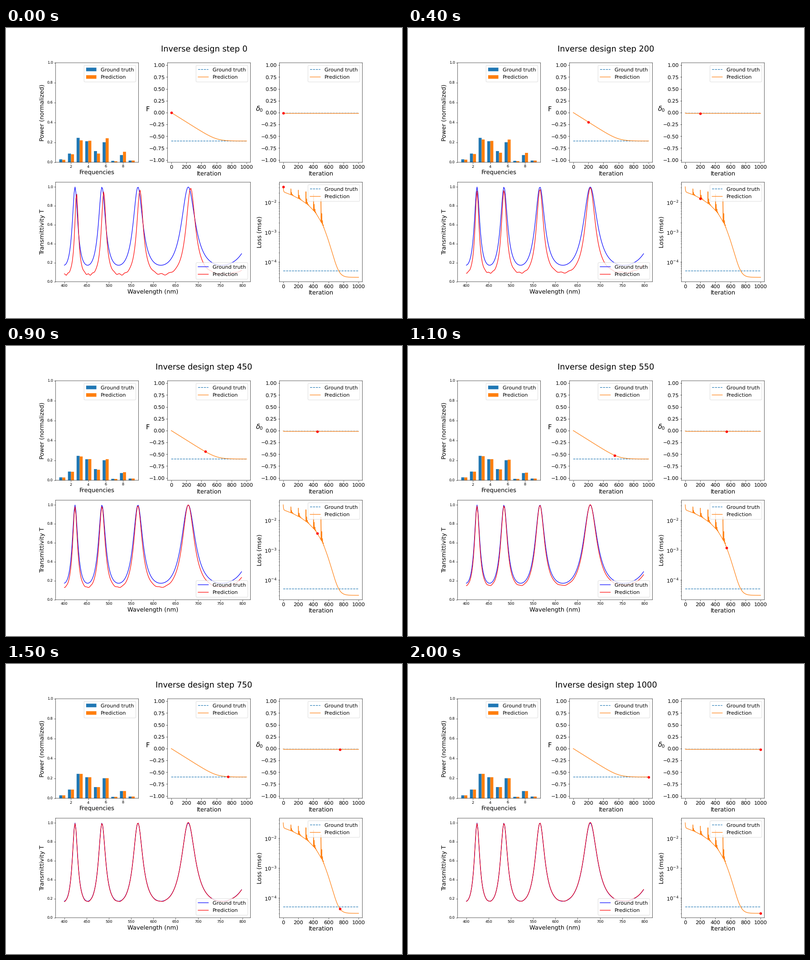
Animation of 874x641 px, one loop 2.1 s. Source, as a matplotlib script:

```python
import numpy as np
import matplotlib.pyplot as plt
from matplotlib.animation import FuncAnimation

W, H = 874, 641
DPI = W / 15
STRIDE, LAST = 50, 1000
SMALL, TICK, LABEL, SYMBOL, TITLE = 10, 14, 16, 18, 22

# Soft, unsnapped lines and glyphs
plt.rcParams.update({
    "font.family": "DejaVu Sans",
    "font.size": SMALL,
    "text.hinting": "none",
    "path.snap": False,
    "legend.fontsize": TICK,
    "legend.labelspacing": 0.53,
    "legend.borderpad": 0.41,
})

steps = np.arange(LAST + 1)
lam = np.arange(400, 800, 2)

# F falls at a constant rate, then settles; delta snaps into place at once
F_TRUE, D_TRUE, LOSS_TRUE = -0.6, -0.013, 5e-5
gap = 0.068 * np.log1p(np.exp((600 - steps) / 68))
jump = np.exp(-steps / 4)
f_path = F_TRUE + gap
d_path = -0.017 + 0.010 * jump


def loss_curve():
    """Loss that follows the gap in F, with a ringing spike every 100 steps."""
    base = 3.05e-5 + 0.278 * gap ** 2 / (1 + 5.92 * gap)
    log = np.log10(base) + 0.17 * jump
    for k in range(5):
        t = np.clip(steps - 100 * k - 101, 0, None)
        ring = np.exp(-t / 12) * np.cos(np.pi * t / 10) ** 2
        log += np.where(steps > 100 * (k + 1), 0.2 * 1.4 ** k * ring, 0)
    return 10 ** log


loss = loss_curve()

orders = np.arange(1, 10)
power_true = np.array([0.030, 0.088, 0.246, 0.212, 0.113, 0.202, 0.015, 0.073, 0.018])
power_start = np.array([0.025, 0.081, 0.221, 0.217, 0.088, 0.242, 0.010, 0.106, 0.018])

PATH = 3391.5


def airy(path, finesse):
    return 1 / (1 + finesse * np.sin(np.pi * path / lam) ** 2)


def predicted_power(step):
    return power_true + (power_start - power_true) * gap[step] / gap[0]


def predicted_spectrum(step):
    q = gap[step] / gap[0]
    path = PATH * (1 + 0.008 * jump[step])
    u = np.clip((lam - 424) / 254, 0, 1)
    gain = 1.007 - 0.02 * q - (0.012 + 0.035 * q) * (1 - u)
    frac = path / lam % 1
    ripple = np.cos(2 * np.pi * (frac - 0.455) / 0.155) * np.sin(np.pi * frac) ** 4
    return gain * airy(path, 4.74 + 6.8 * q) - (0.002 + 0.007 * q) * ripple


fig = plt.figure(figsize=(15 + 1e-6, H / DPI + 1e-6), dpi=DPI, facecolor="white")
grid = fig.add_gridspec(2, 3, left=0.125, right=0.9, bottom=0.125, top=0.88,
                        wspace=0.35, hspace=0.2)
title = fig.suptitle("", fontsize=TITLE, y=0.94)


def panel(spot, xlabel, ylabel, size=LABEL, **kw):
    ax = fig.add_subplot(spot)
    ax.set_xlabel(xlabel, fontsize=LABEL)
    ax.set_ylabel(ylabel, fontsize=size, **kw)
    return ax


def history(spot, ylabel, truth, path, **kw):
    """Dashed target, full optimisation path and a moving marker."""
    ax = panel(spot, "Iteration", ylabel, **kw)
    ax.plot([0, LAST], [truth, truth], "--", color="C0", label="Ground truth")
    ax.plot(steps, path, color="C1", label="Prediction")
    dot, = ax.plot([0], [path[0]], "ro")
    ax.set(xlim=(-50, 1050), xticks=range(0, LAST + 1, 200))
    ax.tick_params(labelsize=TICK)
    ax.legend(loc="upper right")
    return ax, dot


ax_bar = panel(grid[0, 0], "Frequencies", "Power (normalized)")
ax_bar.bar(orders - 0.175, power_true, 0.35, color="C0", label="Ground truth")
bars = ax_bar.bar(orders + 0.175, power_start, 0.35, color="C1", label="Prediction")
ax_bar.set(xlim=(0.215, 9.785), ylim=(0, 1), xticks=range(2, 9, 2))
ax_bar.legend(loc="upper right")

ax_f, dot_f = history(grid[0, 1], "F", F_TRUE, f_path, size=SYMBOL, rotation=0)
ax_d, dot_d = history(grid[0, 2], r"$\delta_0$", D_TRUE, d_path,
                      size=SYMBOL, rotation=0)
for ax in (ax_f, ax_d):
    ax.set(ylim=(-1.05, 1.05), yticks=np.linspace(-1, 1, 9))

ax_t = panel(grid[1, :2], "Wavelength (nm)", "Transmittivity T")
ax_t.plot(lam, airy(PATH, 4.75), "b", label="Ground truth")
curve, = ax_t.plot(lam, predicted_spectrum(0), "r", label="Prediction")
ax_t.set(xlim=(380.1, 817.9), ylim=(0, 1.05), xticks=range(400, 801, 50))
ax_t.legend(loc="lower right")

ax_l, dot_l = history(grid[1, 2], "Loss (mse)", LOSS_TRUE, loss)
ax_l.set_yscale("log")
ax_l.set_ylim(10 ** -4.664, 10 ** -1.336)

tracks = [(dot_f, f_path), (dot_d, d_path), (dot_l, loss)]


def update(i):
    step = i * STRIDE
    title.set_text(f"Inverse design step {step}")
    for bar, height in zip(bars, predicted_power(step)):
        bar.set_height(height)
    for dot, path in tracks:
        dot.set_data([step], [path[step]])
    curve.set_ydata(predicted_spectrum(step))
    return [title, curve, *bars, *(dot for dot, _ in tracks)]


anim = FuncAnimation(fig, update, frames=LAST // STRIDE + 1, interval=100,
                     repeat=True, repeat_delay=0, blit=False)
plt.show()
```
